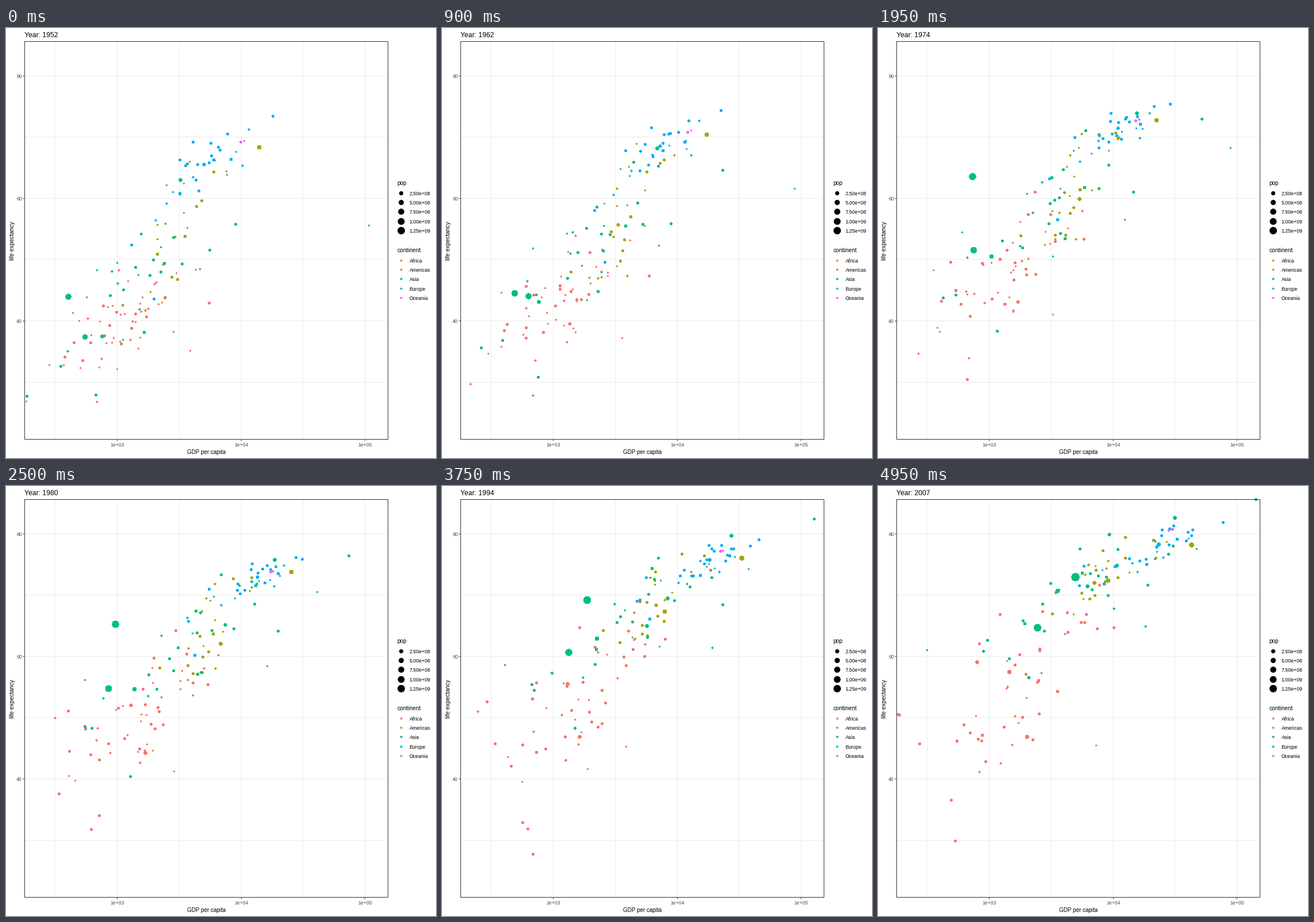
Recreate the animation shown at these times as a matplotlib script. Size 748x748 px, loop 5 s.

```python
import matplotlib.pyplot as plt
import numpy as np
from matplotlib.animation import FuncAnimation
from matplotlib.patches import Rectangle

SIDE, DPI, FRAMES = 748, 100, 100
PX = 72 / DPI
FIRST, LAST = 1952, 2007
MAX_POP = 1318.7
RED, OLIVE, GREEN, BLUE, PINK = "#F8766D", "#A3A500", "#00BF7D", "#00B0F6", "#E76BF3"
INK, GREY, GRID = "#333333", "#4D4D4D", "#EBEBEB"
LEFT, TOP, RIGHT, BOTTOM = 32, 23, 664, 715

plt.rcParams["font.family"] = "Liberation Sans"
rng = np.random.default_rng(12)
years = np.linspace(FIRST, LAST, FRAMES)
knots = np.arange(FIRST, LAST + 1, 5)


def to_x(log_income):
    return 193.5 + 215.2 * (np.asarray(log_income) - 3)


def to_y(life):
    return 83 + 10.66 * (80 - np.asarray(life))


def dot_area(pop):
    """Marker area in square points for a population in millions."""
    size = 1 + 5 * np.sqrt(np.clip(pop / MAX_POP, 0, 1))
    return ((2.134 * size + .4) * PX) ** 2


def scores(n):
    """Evenly spread bell-shaped scores in random order."""
    p = (np.arange(n) + .5) / n
    return rng.permutation(np.log(p / (1 - p)) / 1.81)[:, None]


def wander(n):
    """Scores that drift over the years, with a small kick at each knot."""
    turn = .9 * (knots - FIRST) / (LAST - FIRST)
    drift = np.cos(turn) * scores(n) + np.sin(turn) * scores(n)
    return drift + .06 * rng.standard_normal((n, len(knots)))


def era(values):
    return np.interp(knots, (FIRST, 1980, LAST), values)


def tween(rows):
    return np.array([np.interp(years, knots, row) for row in rows])


spots, areas, colours = [], [], []


def add(x, y, pop, colour):
    spots.append(np.rint(np.stack([x, y], axis=-1)))
    areas.append(dot_area(pop))
    colours.append(colour)


def crowd(colour, n, income, spread, life, life_spread, link, pop, growth):
    """A cloud whose centre and spread are set for the start, 1980 and the end."""
    zx = wander(n)
    zy = link * zx + np.sqrt(1 - link ** 2) * wander(n)
    zy = np.where(zy > 0, .78, 1.05) * zy
    xs = tween(to_x(era(income) + era(spread) * zx))
    ys = tween(to_y(era(life) + era(life_spread) * zy))
    pops = np.minimum(pop * np.exp(1.2 * scores(n)), 80)
    for x, y, p in zip(xs, ys, pops):
        add(x, y, p * growth ** ((years - 1980) / 27), colour)


def track(colour, pops, *stops):
    """One dot through stops of (year, income, life expectancy)."""
    t, income, life = zip(*stops)
    add(np.interp(years, t, to_x(np.log10(income))),
        np.interp(years, t, to_y(life)),
        np.interp(years, (FIRST, LAST), pops), colour)


crowd(RED, 50, (3.0, 3.16, 3.2), (.29, .35, .44), (39.4, 50.5, 55.3),
      (5, 7, 9.5), .45, 5, 2)
crowd(OLIVE, 23, (3.47, 3.77, 3.92), (.2, .21, .26), (53.5, 65.5, 73.8),
      (9, 6.5, 4), .7, 5, 1.5)
crowd(GREEN, 28, (3.14, 3.58, 3.74), (.38, .5, .55), (46.5, 61.5, 71),
      (8.5, 8.5, 7), .75, 10, 1.6)
crowd(BLUE, 29, (3.69, 4.12, 4.34), (.25, .2, .25), (65.5, 72.8, 77.9),
      (5, 2.5, 2.8), .85, 9, 1.08)
crowd(PINK, 2, (4.01, 4.25, 4.47), (.02, .04, .11), (69.3, 73.8, 80.7),
      (.3, .8, .8), .9, 7, 1.4)

track(RED, (33, 135), (1952, 1077, 36.3), (1972, 1698, 42.8), (1997, 1624, 47.5),
      (2007, 2014, 46.9))
track(RED, (2.5, 8.8), (1952, 493, 40), (1982, 882, 46.2), (1987, 848, 44),
      (1992, 737, 23.6), (1997, 590, 36.1), (2007, 863, 46.2))
track(OLIVE, (157, 301), (1952, 13990, 68.4), (1977, 24073, 73.4), (2007, 42952, 78.2))
track(OLIVE, (56, 190), (1952, 2109, 50.9), (1962, 3337, 55.7), (1980, 6850, 62.2),
      (2007, 9066, 72.4))
track(GREEN, (556, 1319), (1952, 400, 44), (1962, 488, 44.5), (1967, 613, 58.4),
      (1972, 677, 63.1), (1992, 1656, 68.7), (2007, 4959, 73))
track(GREEN, (372, 1110), (1952, 547, 37.4), (1972, 724, 50.7), (1987, 977, 58.6),
      (2007, 2452, 64.7))
track(GREEN, (82, 223), (1952, 750, 37.5), (1967, 762, 46), (1982, 1517, 56.2),
      (2007, 3541, 70.7))
track(GREEN, (86, 127), (1952, 3217, 63), (1972, 14779, 73.4), (1992, 26825, 79.4),
      (2007, 31656, 82.6))
track(GREEN, (.2, 2.5), (1952, 108382, 55.6), (1967, 80895, 64.6), (1972, 109348, 67.7),
      (1982, 31354, 71.3), (2007, 47307, 77.6))
track(BLUE, (22, 71), (1952, 1969, 43.6), (1980, 4250, 60.3), (2007, 8458, 71.8))

spots, areas = np.array(spots), np.array(areas)

fig = plt.figure(figsize=(SIDE / DPI, SIDE / DPI), dpi=DPI, facecolor="white")
ax = fig.add_axes([0, 0, 1, 1])
ax.set(xlim=(-.5, SIDE - .5), ylim=(SIDE - .5, -.5))
ax.axis("off")


def line(x, y, colour):
    ax.plot(x, y, color=colour, lw=PX, solid_capstyle="butt", snap=False, zorder=1)


def label(x, y, text, size, colour="black", **kw):
    return ax.text(x, y, text, fontsize=size * PX, color=colour, **kw)


def dots(x, y, area, colour):
    return ax.scatter(x, y, s=area, c=colour, linewidths=0, antialiased=False, zorder=3)


for i in range(6):
    x, y = round(85.4 + 107.72 * i), round(82.8 + 106.55 * i)
    line([x, x], [TOP, BOTTOM], GRID)
    line([LEFT, RIGHT], [y, y], GRID)
    if i % 2:
        line([x, x], [BOTTOM, BOTTOM + 3], INK)
        label(x, 728, f"1e+0{3 + i // 2}", 8.6, GREY, ha="center")
    else:
        line([LEFT - 3, LEFT], [y, y], INK)
        label(27.5, y + 3.5, str(80 - 10 * i), 8.8, GREY, ha="right")
ax.add_patch(Rectangle((LEFT, TOP), RIGHT - LEFT, BOTTOM - TOP, fill=False,
                       ec=INK, lw=PX, snap=False, zorder=4))

label(348, 741, "GDP per capita", 9.9, ha="center")
label(11, 370, "life expectancy", 10.3, ha="center", va="center", rotation=90)
title = label(31.5, 16, "", 12.1)

label(680, 273, "pop", 10.1)
label(680, 390, "continent", 10.1)
names = ("Africa", "Americas", "Asia", "Europe", "Oceania")
for i, (name, colour) in enumerate(zip(names, (RED, OLIVE, GREEN, BLUE, PINK))):
    y, step = round(287 + 16.2 * i), 250 * (i + 1)
    dots([687], [y], dot_area(step), "black")
    label(701, y + 4, f"{step * 1e6:.2e}", 8.8)
    y = round(404 + 16.2 * i)
    dots([687], [y], dot_area(20), colour)
    label(701, y + 4, name, 8.8)

cloud = dots(spots[:, 0, 0], spots[:, 0, 1], areas[:, 0], colours)


def update(k):
    cloud.set_offsets(spots[:, k])
    cloud.set_sizes(areas[:, k])
    title.set_text(f"Year: {int(years[k] + .5)}")
    return cloud, title


anim = FuncAnimation(fig, update, frames=FRAMES, interval=50, repeat=True, repeat_delay=0)
plt.show()
```
